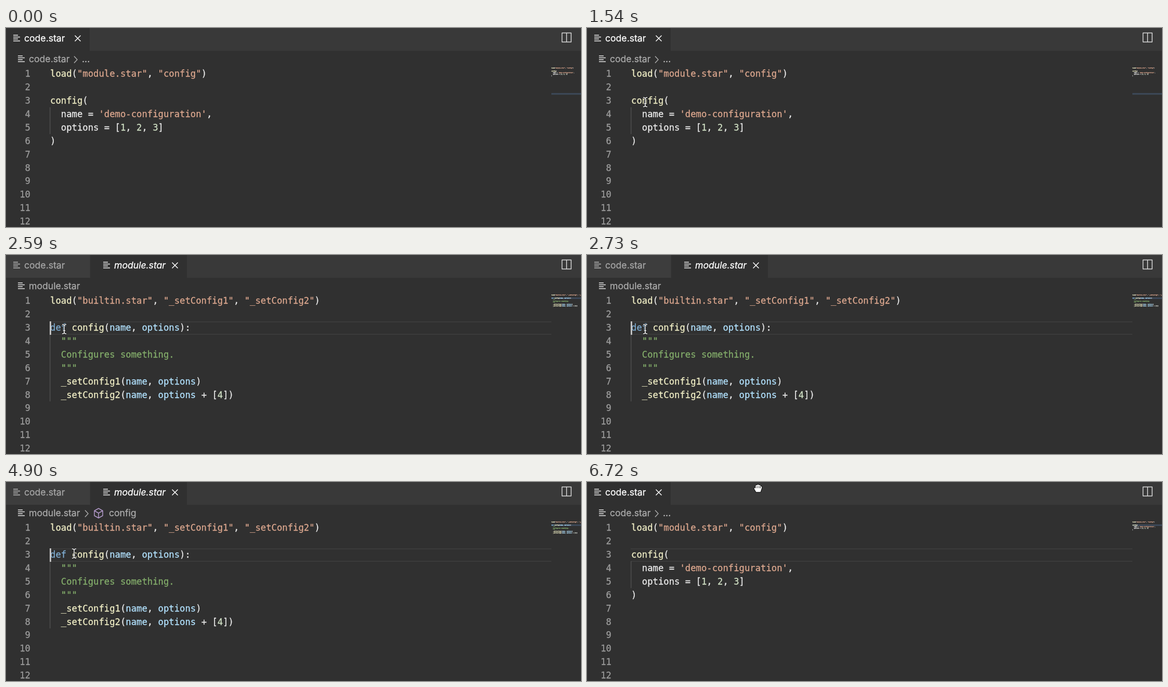
These frames come from a looping animation (1106 by 384 pixels, 6790 ms). An HTML page with a canvas:

```html
<!DOCTYPE html>
<html lang="en">
<head>
<meta charset="utf-8">
<title>Go to definition</title>
<style>
  html, body { margin: 0; width: 100%; height: 100%; overflow: hidden; background: #303030; }
  canvas { display: block; }
</style>
</head>
<body>
<canvas id="stage" width="1106" height="384"></canvas>
<script>
const ctx = document.getElementById('stage').getContext('2d');

const LOOP = 6790, HOVER = 1610, OPEN = 2590, SYMBOL = 2900, CLOSE = 6020;
const CODE_X = 85, CODE_SIZE = 17.24, CHAR_W = 10.38, LINE_H = 25.9, FIRST_Y = 88;
const MONO = '"DejaVu Sans Mono", monospace', SANS = 'Inter, sans-serif';
const BG = '#303030', BRIGHT = '#ffffff', MUTED = '#ababab';
const COLORS = { f: '#f1efc6', s: '#dca78e', w: '#ececec', k: '#7fadd2', p: '#b2e2ff', c: '#84ae6b', n: '#d0e0c4' };

// Each line alternates colour key and text, separated by "|".
const CODE = [
  'f|load|w|(|s|"module.star"|w|, |s|"config"|w|)', '',
  'f|config|w|(',
  "w|  name = |s|'demo-configuration'|w|,",
  'w|  options = [|n|1|w|, |n|2|w|, |n|3|w|]',
  'w|)'
];
const MODULE = [
  'f|load|w|(|s|"builtin.star"|w|, |s|"_setConfig1"|w|, |s|"_setConfig2"|w|)', '',
  'k|def |f|config|w|(|p|name|w|, |p|options|w|):',
  'c|  """', 'c|  Configures something.', 'c|  """',
  'f|  _setConfig1|w|(|p|name|w|, |p|options|w|)',
  'f|  _setConfig2|w|(|p|name|w|, |p|options|w| + [|n|4|w|])'
];
const SIGNATURE = 'k|def |f|config|w|(|p|name|w|, |p|options|w|)';

// Mouse path: time, x, y
const PATH = [
  [490, 425, 394], [1190, 113, 145], [1260, 112, 143], [4690, 112, 143],
  [4900, 131, 138], [5600, 331, 19], [5950, 331, 19], [6160, 329, 12]
];

function rect(x, y, w, h, color) {
  ctx.fillStyle = color;
  ctx.fillRect(x, y, w, h);
}

// A hairline outline gives the type its slightly heavier weight.
function text(str, x, y, font, color, align = 'left', weight = 0.3) {
  ctx.font = font;
  ctx.fillStyle = ctx.strokeStyle = color;
  ctx.textAlign = align;
  ctx.lineWidth = weight;
  ctx.lineJoin = 'round';
  ctx.fillText(str, x, y);
  ctx.strokeText(str, x, y);
}

function stroke(path, color, width = 1.5) {
  ctx.strokeStyle = color;
  ctx.lineWidth = width;
  ctx.lineJoin = 'round';
  ctx.stroke(new Path2D(path));
}

function label(str, x, y, color, style = '') {
  text(str, x, y, `${style} 17.6px ${SANS}`, color);
}

function codeLine(line, x, y, size = CODE_SIZE, charW = CHAR_W) {
  const parts = line.split('|');
  for (let i = 0; i + 1 < parts.length; i += 2) {
    text(parts[i + 1], x, y, `${size}px ${MONO}`, COLORS[parts[i]]);
    x += parts[i + 1].length * charW;
  }
}

function fileIcon(x, y, color) {
  [9, 13, 9, 13].forEach((w, i) => rect(x, y + i * 3.7, w, 1.6, color));
}

const closeIcon = (x, y) => stroke(`M${x - 5.5} ${y - 5.5}l11 11m0 -11l-11 11`, BRIGHT);
const chevron = x => stroke(`M${x} 54.5l6 6.5l-6 6.5`, MUTED);

function header(inModule, symbol) {
  rect(0, 0, 1106, 44, '#393939');
  if (inModule) {
    rect(0, 0, 161, 44, '#3d3d3d');
    rect(162, 0, 186, 44, BG);
    fileIcon(14, 13, '#b4b4b4');
    label('code.star', 35, 26, '#a6a6a6');
    fileIcon(187, 13, '#e4e4e4');
    label('module.star', 208, 26, BRIGHT, 'italic');
    closeIcon(325, 20);
  } else {
    rect(0, 0, 161, 44, BG);
    fileIcon(14, 13, '#e4e4e4');
    label('code.star', 35, 26, BRIGHT);
    closeIcon(138, 20);
  }
  stroke('M1069.5 9.5h17.5v17.5h-17.5zM1078.3 9.5v17.5', '#d8d8d8');

  fileIcon(23, 53, '#dadada');
  label(inModule ? 'module.star' : 'code.star', 44, 66, MUTED);
  if (!inModule) {
    chevron(131);
    label('...', 146, 66, '#c4c4c4');
  } else if (symbol) {
    chevron(152);
    stroke('M178 51l8 4.5v9.5l-8 4.5l-8 -4.5v-9.5zM170 55.5l8 4.5l8 -4.5M178 60v9.5', '#b39acb');
    label('config', 198, 66, MUTED);
  }
}

function minimap(lines, currentLine) {
  rect(1049, 76 + 2.92 * (currentLine - 1), 57, 2.9, '#3d4a5b');
  lines.forEach((line, i) => codeLine(line, 1049, 78.4 + i * 2.92, 2.45, 1.475));
}

function editor(lines, lineActive, caret, wordLit) {
  if (lineActive) {
    rect(84, 128, 965, 2, '#3b3b3b');
    rect(84, 152, 965, 2, '#3b3b3b');
  }
  rect(84, 153, 1.4, LINE_H * (lines === CODE ? 2 : 5), '#505050');
  if (wordLit) rect(84, 128, 63, 25, '#344150');
  for (let i = 0; i < 12; i++) {
    const y = FIRST_Y + 6.2 + i * LINE_H;
    text(i + 1, 47, y, `${CODE_SIZE}px ${MONO}`, '#9c9c9c', 'right');
    if (lines[i]) codeLine(lines[i], CODE_X, y);
  }
  if (caret) rect(84, 128, 2.9, 26, '#c6c6c6');
}

function tooltip(opacity) {
  ctx.globalAlpha = opacity;
  rect(84, 54, 286, 76, '#565656');
  rect(85, 55, 284, 74, '#353535');
  codeLine(SIGNATURE, 97, 80.2);
  text('Configures something.', 97, 117, `16.3px ${SANS}`, '#e4e4e4');
  ctx.globalAlpha = 1;
}

function mouseAt(t) {
  const next = PATH.findIndex(p => p[0] > t);
  if (next < 0) return PATH[PATH.length - 1].slice(1);
  const [t0, x0, y0] = PATH[next - 1], [t1, x1, y1] = PATH[next];
  const u = (t - t0) / (t1 - t0), e = u * u * (3 - 2 * u);
  return [x0 + (x1 - x0) * e, y0 + (y1 - y0) * e];
}

function hand(open) {
  const shape = open
    ? 'M-4 8L-8 1Q-8 -2 -5 0L-5 -5Q-4 -8 -2 -6Q0 -10 2 -6Q5 -8 5 -4Q8 -5 8 -1L5 8Z'
    : 'M-3 8L-8 1Q-8 -2 -4 0L-5 -6Q-4 -10 -2 -6L-1 -2Q1 -4 3 -2Q5 -3 6 -1Q8 -1 8 2L6 8Z';
  ctx.scale(0.92, 0.92);
  stroke(shape, '#151515', 2.4);
  ctx.fillStyle = '#fff';
  ctx.fill(new Path2D(shape));
  stroke(open ? 'M-2 -5v5M2 -5v5M5 -4v4' : 'M0 2v4M3 2v4', '#222', 1.1);
}

function mouse(t) {
  if (t < PATH[0][0]) return;
  const [x, y] = mouseAt(t);
  ctx.save();
  ctx.translate(x, y);
  if (y < 70) {
    hand(t >= CLOSE);
  } else {
    const beam = 'M-4 -9Q0 -9 0 -6V6Q0 9 -4 9M4 -9Q0 -9 0 -6M0 6Q0 9 4 9M-2 3h4';
    stroke(beam, '#1c1c1c', 3);
    stroke(beam, '#f5f5f5', 1.5);
  }
  ctx.restore();
}

function draw(t) {
  const inModule = t >= OPEN && t < CLOSE;
  const hovering = t >= HOVER && t < OPEN;
  const lines = inModule ? MODULE : CODE;
  const blinkOn = (t - OPEN) % 1000 < 500;

  rect(0, 0, 1106, 384, BG);
  header(inModule, t >= SYMBOL);
  minimap(lines, t < OPEN ? 18 : 3);
  editor(lines, t >= OPEN, inModule && blinkOn, hovering);
  if (hovering) tooltip(Math.min(1, (t - HOVER) / 100));
  mouse(t);
}

const start = performance.now();
function tick() {
  draw((performance.now() - start) % LOOP);
  requestAnimationFrame(tick);
}
tick();
</script>
</body>
</html>
```
